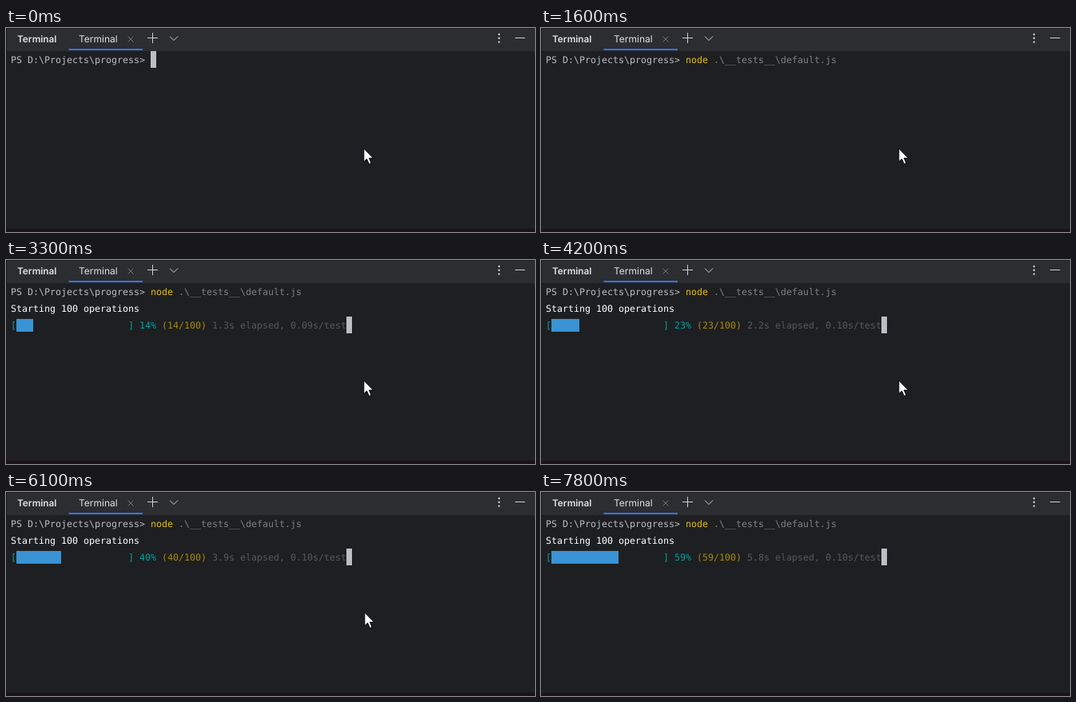
Recreate the animation shown at these times as an HTML page. Size 662 by 256 pixels, loop 8 s.

```html
<!DOCTYPE html>
<html lang="en">
<head>
<meta charset="utf-8">
<title>Terminal progress</title>
<style>
  html, body { margin: 0; width: 100%; height: 100%; overflow: hidden; background: #1e1f22; }
  svg { display: block; width: 662px; height: 256px; }
  text { white-space: pre; text-rendering: geometricPrecision; }
  .ui { font: 12px Inter, Roboto, sans-serif; fill: #dfe1e5; }
  .mono { font: 11.63px "DejaVu Sans Mono", "Noto Sans Mono", monospace; }
  .icon { fill: none; stroke: #ced0d6; stroke-width: 1; }
</style>
</head>
<body>
<svg viewBox="0 0 662 256">
  <rect width="662" height="256" fill="#1e1f22"/>
  <rect width="662" height="29" fill="#2b2d30"/>
  <rect width="662" height="1" fill="#1e1f22"/>
  <rect width="1" height="256" fill="#18191b"/>
  <rect y="252" width="662" height="4" fill="#1b121b"/>

  <text class="ui" x="14" y="18" style="font-weight:600;font-size:11.8px">Terminal</text>
  <text class="ui" x="91" y="18">Terminal</text>
  <rect x="78.5" y="26" width="92.5" height="2" fill="#3574f0"/>
  <path class="icon" d="M152.5 10.5l7 7m0-7l-7 7" style="stroke:#6f737a"/>
  <path class="icon" d="M177 12.5h13M183.5 6v13M205 10.5l5 5 5-5M637 12.5h12.5"/>
  <g fill="#ced0d6">
    <circle cx="617" cy="8" r="1.2"/>
    <circle cx="617" cy="12.8" r="1.2"/>
    <circle cx="617" cy="17.6" r="1.2"/>
  </g>

  <rect id="bar" x="13" y="74" height="16" fill="#3993d4"/>
  <g class="mono">
    <text id="command" y="44"></text>
    <text id="heading" y="65"></text>
    <text id="status" y="86"></text>
  </g>
  <rect id="caret" width="7" height="21" fill="#bcbec4"/>
  <path id="pointer" d="M0 0v16.5l3.7-3.5 2.8 6.4 2.8-1.2-2.8-6.2h5.3z" fill="#fff" stroke="#000"/>
</svg>
<script>
const LOOP = 8000, STEP = 100;
const CELL = 7, LEFT = 6, ROW = 21, TOP = 29, BAR_CELLS = 20;
const TYPE = 100, BLINK = 700, RECALL = 1000, ENTER = 1600, RUN = 2500;
const EXIT = 6000, EXIT_TIME = 300;
const PROMPT = 'PS D:\\Projects\\progress> ';
const ARGS = ' .\\__tests__\\default.js';

// Key points of the counter: [ms, finished operations]
const pace = [[RUN, 1], [3300, 14], [5100, 32], [6100, 40], [7300, 52], [7800, 59]];

const el = id => document.getElementById(id);
const colX = col => LEFT + col * CELL;

function finished(t) {
  const next = pace.findIndex(point => point[0] > t);
  if (next < 0) return pace.at(-1)[1];
  const [t0, n0] = pace[next - 1], [t1, n1] = pace[next];
  return Math.floor(n0 + (n1 - n0) * (t - t0) / (t1 - t0));
}

// Writes [text, colour] parts on the character grid and returns the end column.
function write(id, parts) {
  let col = 0;
  const spans = parts.map(([text, fill]) => {
    const span = document.createElementNS('http://www.w3.org/2000/svg', 'tspan');
    span.setAttribute('x', colX(col));
    span.setAttribute('fill', fill);
    span.textContent = text;
    col += text.length;
    return span;
  });
  el(id).replaceChildren(...spans);
  return col;
}

function placeCaret(col, row, visible) {
  el('caret').setAttribute('x', colX(col));
  el('caret').setAttribute('y', TOP + row * ROW);
  el('caret').style.display = visible ? '' : 'none';
}

function drawCommand(t) {
  const recalled = t >= RECALL;
  const typed = Math.max(0, Math.floor((t - TYPE) / STEP));
  const col = write('command', [
    [PROMPT, '#bcbec4'],
    [recalled ? 'node' : 'nod'.slice(0, typed), '#e5bf00'],
    [recalled ? ARGS : '', '#808080']
  ]);
  placeCaret(col, 0, recalled ? t < ENTER : t < BLINK);
}

function drawProgress(t) {
  const running = t >= RUN;
  const done = running ? finished(t) : 0;
  const elapsed = (done - 1) * 0.1005;
  el('bar').setAttribute('width', Math.round(done / 100 * BAR_CELLS) * CELL);
  write('heading', running ? [['Starting 100 operations', '#ffffff']] : []);
  const col = write('status', running ? [
    [`[${' '.repeat(BAR_CELLS)}] ${done}%`, '#00a3a3'],
    [` (${done}/100)`, '#a68a0d'],
    [` ${elapsed.toFixed(1)}s elapsed, ${(elapsed / done).toFixed(2)}s/test`, '#595959']
  ] : []);
  if (running) placeCaret(col, 2, true);
}

function drawPointer(t) {
  const p = Math.min(1, Math.max(0, (t - EXIT) / EXIT_TIME));
  el('pointer').setAttribute('transform', `translate(${447.8 + 250 * p ** 5} 151.3)`);
}

function draw(time) {
  const t = Math.floor(time / STEP) * STEP;
  drawCommand(t);
  drawProgress(t);
  drawPointer(t);
}

const start = performance.now();
function frame() {
  draw((performance.now() - start) % LOOP);
  requestAnimationFrame(frame);
}
draw(0);
requestAnimationFrame(frame);
</script>
</body>
</html>
```
